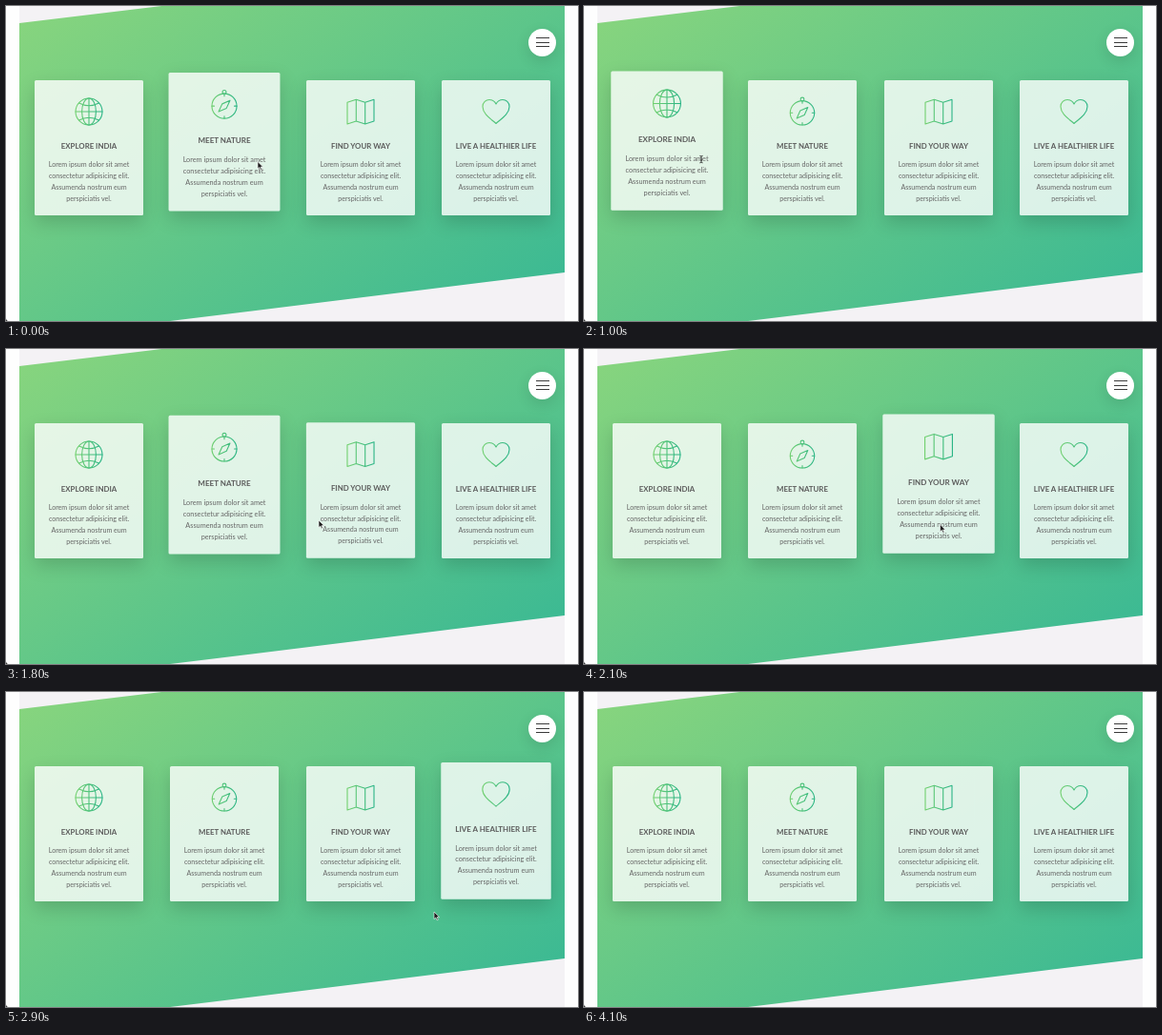
An HTML page for the animation above (4.3 s loop, 600 px wide and 331 px high).

```html
<!DOCTYPE html>
<html lang="en">
<head>
<meta charset="utf-8">
<title>Feature cards</title>
<style>
  html, body { margin: 0; width: 100%; height: 100%; overflow: hidden; background: #fefefe; }
  #stage { position: absolute; left: 0; top: 0; width: 600px; height: 331px; overflow: hidden; }
  #stage > svg { position: absolute; left: 0; top: 0; }
  .card {
    position: absolute; top: 78px; width: 114px; height: 142px;
    border-radius: 1.5px;
    background: rgba(255, 255, 255, .8);
    box-shadow: 0 7.35px 19.6px rgba(0, 0, 0, .17);
  }
  .card svg { display: block; overflow: visible; }
  .card text { font: 400 7.12px Lato, sans-serif; fill: #666; text-anchor: middle; }
  .card .title { font-weight: 700; font-size: 7.85px; fill: #5c5c5c; }
  .icon { fill: none; stroke: url(#ink); stroke-width: 1.1; stroke-linejoin: round; stroke-linecap: round; }
  .menu {
    position: absolute; left: 548px; top: 23.5px; width: 29px; height: 29px;
    border-radius: 50%; background: #fff;
    box-shadow: 0 4.9px 14.7px rgba(0, 0, 0, .12);
  }
  .menu i { position: absolute; left: 7.5px; width: 14px; height: 1px; background: #3a3a3a; }
</style>
</head>
<body>
<div id="stage">
  <svg width="600" height="331">
    <defs>
      <linearGradient id="field" x1="0" y1="0" x2="1" y2="1">
        <stop stop-color="#8ed77c"/><stop offset="1" stop-color="#35b795"/>
      </linearGradient>
      <linearGradient id="ink" gradientUnits="userSpaceOnUse" x1="43" y1="0" x2="71" y2="0">
        <stop stop-color="#72d06f"/><stop offset="1" stop-color="#28b485"/>
      </linearGradient>
    </defs>
    <rect x="14" width="572" height="331" fill="#f4f2f5"/>
    <path d="M14 18L586 -51V280L14 350.5Z" fill="url(#field)"/>
    <path d="M0 328.5Q.4 330.6 2 331H0Z" fill="#222"/>
  </svg>
  <div class="menu"><i style="top:9.5px"></i><i style="top:14px"></i><i style="top:18.5px"></i></div>
  <div id="cards"></div>
  <svg width="600" height="331">
    <g id="pointer">
      <path id="arrow" d="M0 0V7.6L1.8 6 3 8.8 4.3 8.3 3.1 5.6H5.5Z" fill="#1c1c1c" stroke="#fff" stroke-width=".6"/>
      <path id="beam" d="M-1.6 -3.6Q0 -3.6 0 -2.6Q0 -3.6 1.6 -3.6M0 -2.6V2.8M-1.6 3.8Q0 3.8 0 2.8Q0 3.8 1.6 3.8M-.8 1H.8" fill="none" stroke="#2a2a2a" stroke-width=".9"/>
    </g>
  </svg>
</div>
<script>
const LOOP = 4300, STEP = 100, LAST = 4100, FADE = 300;
const LIFT = 7.35, GROW = .03;

const LINES = ['Lorem ipsum dolor sit amet', 'consectetur adipisicing elit.',
  'Assumenda nostrum eum', 'perspiciatis vel.'];

// hover: [enter, leave] times in ms
const CARDS = [
  { title: 'EXPLORE INDIA', hover: [[600, 1290]],
    icon: `<circle cx="57" cy="33" r="14"/><ellipse cx="57" cy="33" rx="7.4" ry="14"/>
      <path d="M57 19V47M43 33H71M46.6 24Q57 29.4 67.4 24M46.6 42Q57 36.6 67.4 42"/>` },
  { title: 'MEET NATURE', hover: [[-165, 495], [1330, 1762]],
    icon: `<circle cx="57" cy="34.3" r="12.7"/><circle cx="57" cy="20" r="1.9"/>
      <path d="M57 21.9V24.2M57 44.6V47M44.3 34.3H46.7M67.3 34.3H69.7M62.8 28.5L59.2 36.5 51.2 40.1 54.8 32.1Z"/>` },
  { title: 'FIND YOUR WAY', hover: [[1775, 2340]],
    icon: `<path d="M43 23.3L52.3 20.3 61.7 23.3 71 20.3V43L61.7 46 52.3 43 43 46ZM52.3 20.3V43M61.7 23.3V46"/>` },
  { title: 'LIVE A HEALTHIER LIFE', hover: [[2392, 2800]],
    icon: `<path d="M57 45.5C52 41 43 35.5 43 27.8C43 23 46.5 20.5 50 20.5C53.3 20.5 55.7 22.5 57 25
      C58.3 22.5 60.7 20.5 64 20.5C67.5 20.5 71 23 71 27.8C71 35.5 62 41 57 45.5Z"/>` }
];

// pointer stops: time, x, y
const PATH = [
  [0, 264, 163.5], [200, 238, 163], [500, 160.5, 159.5], [600, 143, 160], [750, 126, 161],
  [1000, 123, 161], [1200, 129, 163], [1340, 172, 168], [1600, 236, 174], [1760, 286, 178],
  [1800, 328, 180], [2050, 362, 184], [2340, 429, 186], [2392, 457, 186], [2500, 470, 186],
  [2650, 482, 198], [2800, 468, 222], [3000, 430, 240], [3200, 412, 242], [3600, 412, 242],
  [3750, 443, 225], [3950, 445, -12], [4300, 445, -12]
];
const BEAM = [[700, 1200], [1450, 1700]];

const $ = id => document.getElementById(id);
const inside = (t, spans) => spans.some(([a, b]) => t >= a && t < b);

$('cards').innerHTML = CARDS.map((c, i) => `
  <div class="card" style="left:${29.9 + i * 142.4}px"><svg width="114" height="142">
    <g class="icon">${c.icon}</g>
    <text class="title" x="57" y="72">${c.title}</text>
    ${LINES.map((s, n) => `<text x="57" y="${91.4 + n * 11.75}">${s}</text>`).join('')}
  </svg></div>`).join('');
const boxes = document.querySelectorAll('.card');

// CSS "ease": cubic-bezier(.25, .1, .25, 1)
function ease(x) {
  if (x <= 0) return 0;
  if (x >= 1) return 1;
  const curve = (u, a, b) => 3 * u * (1 - u) * ((1 - u) * a + u * b) + u ** 3;
  let lo = 0, hi = 1;
  for (let i = 0; i < 20; i++) {
    const mid = (lo + hi) / 2;
    if (curve(mid, .25, .25) < x) lo = mid; else hi = mid;
  }
  return curve(lo, .1, 1);
}

const raised = (t, spans) => Math.max(...spans.map(([a, b]) =>
  ease((t - a) / FADE) * (1 - ease((t - b) / FADE))));

function pointerAt(t) {
  const i = PATH.findIndex(p => p[0] > t);
  const [t0, x0, y0] = PATH[i - 1], [t1, x1, y1] = PATH[i];
  const k = (t - t0) / (t1 - t0);
  return [x0 + (x1 - x0) * k, y0 + (y1 - y0) * k];
}

function draw() {
  const t = Math.min(LAST, Math.floor(performance.now() % LOOP / STEP) * STEP);
  CARDS.forEach((c, i) => {
    const p = raised(t, c.hover);
    boxes[i].style.transform = p ? `translateY(${-LIFT * p}px) scale(${1 + GROW * p})` : 'none';
  });
  const beam = inside(t, BEAM);
  $('pointer').setAttribute('transform', `translate(${pointerAt(t)})`);
  $('beam').style.display = beam ? '' : 'none';
  $('arrow').style.display = beam ? 'none' : '';
  requestAnimationFrame(draw);
}
draw();
</script>
</body>
</html>
```
